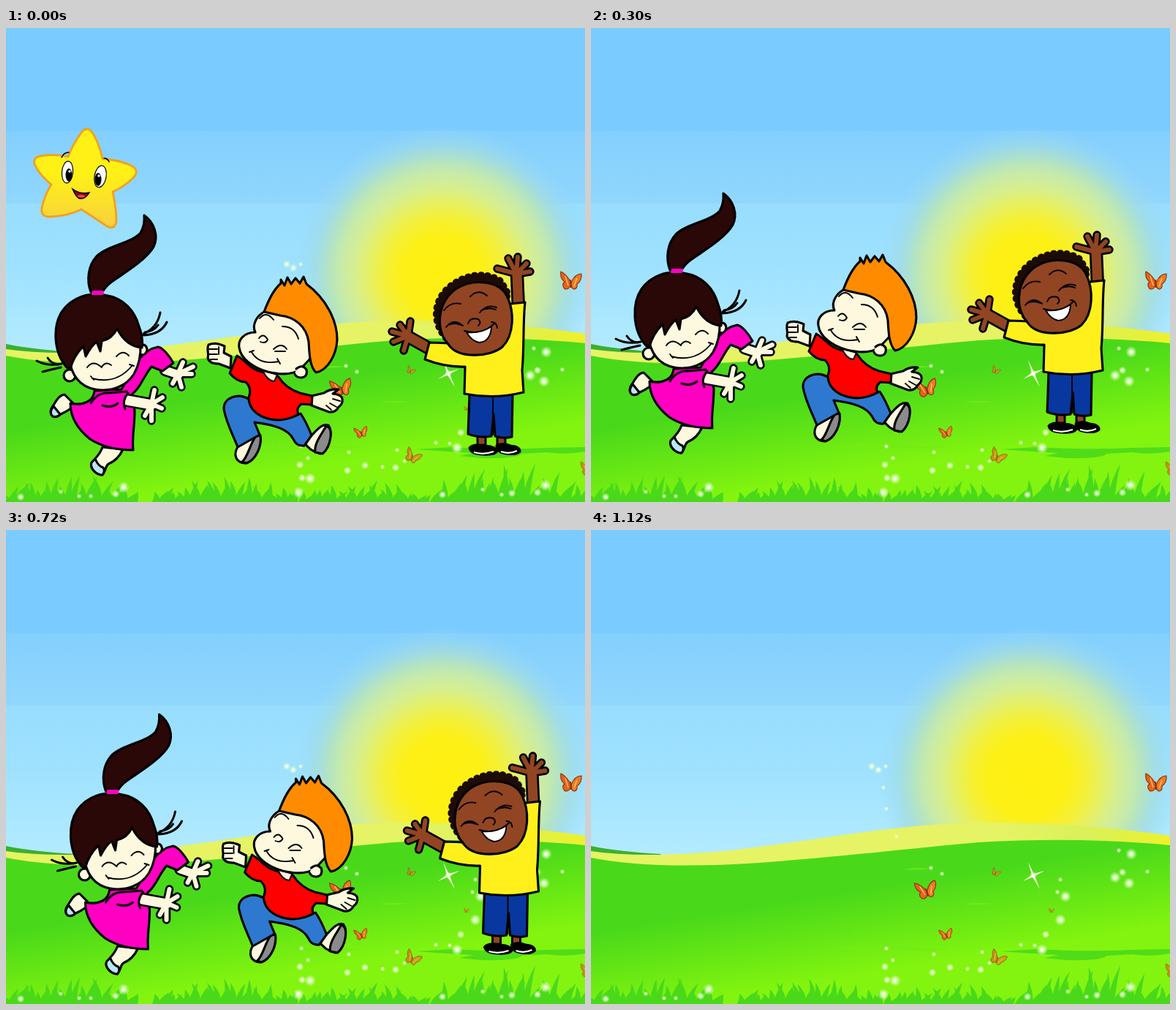
These frames come from a looping animation (792 by 648 pixels, 1.2 s). An HTML page:

```html
<!DOCTYPE html>
<html lang="en">
<head>
<meta charset="utf-8">
<title>Children on a sunny meadow</title>
<style>
  html, body { margin: 0; width: 100%; height: 100%; overflow: hidden; }
  svg { display: block; width: 100vw; height: 100vh; }
  .ink { stroke: #000; stroke-width: 3.1; stroke-linejoin: round; stroke-linecap: round; }
  .line { fill: none; stroke: #000; stroke-width: 1.9; stroke-linecap: round; stroke-linejoin: round; }
  .bold { stroke-width: 3; }
  .skin { fill: #fdf8de; }
  .brown { fill: #914523; }
  .hair { fill: #290807; }
  .pink { fill: #ff00c3; }
  .red { fill: #f00; }
  .orange { fill: #ff8c00; }
  .denim { fill: #2f78cf; }
  .navy { fill: #08379f; }
  .yellow { fill: #fff01c; }
  .sole { fill: #8b8b8b; }
  .shoe { fill: #b9e6f5; }
</style>
</head>
<body>
<svg id="scene" viewBox="0 0 792 648" preserveAspectRatio="none">
  <defs>
    <linearGradient id="sky" x2="0" y2="1">
      <stop offset="0" stop-color="#7acbff"/><stop offset=".3" stop-color="#7acbff"/>
      <stop offset=".3" stop-color="#83cffe"/><stop offset=".51" stop-color="#91d7fd"/>
      <stop offset=".51" stop-color="#98ddfe"/><stop offset=".7" stop-color="#9fe2ff"/>
      <stop offset="1" stop-color="#b8edff"/>
    </linearGradient>
    <radialGradient id="sun" gradientUnits="userSpaceOnUse" cx="598" cy="338" r="205">
      <stop offset="0" stop-color="#fff00f"/><stop offset=".27" stop-color="#fdf016"/>
      <stop offset=".39" stop-color="#f4f038"/><stop offset=".49" stop-color="#e6f063"/>
      <stop offset=".59" stop-color="#d6ee90"/><stop offset=".68" stop-color="#c8eba8"/>
      <stop offset=".76" stop-color="#b5e4c0"/><stop offset=".86" stop-color="#a3dcdf" stop-opacity=".7"/>
      <stop offset="1" stop-color="#98d9f8" stop-opacity="0"/>
    </radialGradient>
    <linearGradient id="ridge" gradientUnits="userSpaceOnUse" x1="560" x2="792">
      <stop offset="0" stop-color="#e6f364"/><stop offset=".5" stop-color="#d9f15a"/><stop offset="1" stop-color="#eef02a"/>
    </linearGradient>
    <linearGradient id="meadow" gradientUnits="userSpaceOnUse" x1="400" y1="488" x2="418" y2="600">
      <stop offset="0" stop-color="#4ad91a"/><stop offset="1" stop-color="#82f40f"/>
    </linearGradient>
    <linearGradient id="gold" x2="0" y2="1">
      <stop offset=".45" stop-color="#fff115"/><stop offset="1" stop-color="#f8d040"/>
    </linearGradient>
    <radialGradient id="glow">
      <stop offset="0" stop-color="#fff"/><stop offset=".3" stop-color="#f4ffe6" stop-opacity=".85"/>
      <stop offset=".6" stop-color="#e8ffc8" stop-opacity=".5"/><stop offset="1" stop-color="#dfffc0" stop-opacity="0"/>
    </radialGradient>
    <g id="butterfly" stroke="#8a300c" stroke-width="1.1">
      <path fill="#e8621a" d="M0,3 C-4,-4 -9,-10 -14,-12 C-15,-6 -13,-1 -9,2 C-13,5 -11,12 -6,12 C-2,11 0,7 0,3Z"/>
      <path fill="#f07a1e" d="M0,3 C3,-4 8,-9 14,-9 C15,-3 12,3 8,5 C9,11 5,13 2,11 C0,9 0,6 0,3Z"/>
      <path d="M-8,-6 L-4,7 M8,-3 L4,8" stroke="#ffd27a"/>
      <path d="M-1,-1 L0,10" stroke-width="2"/>
    </g>
  </defs>

  <rect width="792" height="470" fill="url(#sky)"/>
  <circle cx="598" cy="338" r="205" fill="url(#sun)"/>
  <path d="M0,432 Q40,440 96,443 L90,448 L0,444Z" fill="#3bb02f"/>
  <path d="M0,439 Q75,450 200,437 C330,421 420,401 540,400 Q670,400 792,418 V470 H0Z" fill="url(#ridge)"/>
  <path d="M0,448 C60,460 140,461 230,455 C350,446 450,434 530,427 Q670,419 792,431 V648 H0Z" fill="url(#meadow)"/>
  <g fill="#73ec14">
    <path d="M428,464 Q446,461 464,463 Q446,465 428,464Z"/>
    <path d="M510,511 Q532,509 552,511 Q530,513 510,511Z"/>
    <path d="M325,573 L362,570 365,565 369,570 375,562 380,569 386,565 391,569 397,561 403,569 411,565 415,570 424,567 430,571 Q470,572 490,574 Q400,577 325,573Z"/>
  </g>
  <path fill="#50dc18" d="M560,576 L610,573 Q680,577 740,574 L792,573 V579 Q765,584 740,580 L705,582 Q700,589 650,588 L620,585 640,581 Q600,579 560,576Z"/>
  <path id="grass" fill="#4ad91a"/>
  <g id="dots" fill="url(#glow)"/>
  <path fill="#fdffe6" d="M598,454 L605.5,470 620,466 607,473 614,491 604,474.5 591,480 603,471.5Z"/>
  <circle cx="605" cy="472" r="5" fill="url(#glow)"/>
  <use href="#butterfly" transform="translate(773 345)"/>
  <use href="#butterfly" transform="translate(459 491) rotate(-14)"/>
  <use href="#butterfly" transform="translate(486 552) rotate(-15) scale(.62)"/>
  <g opacity=".7">
    <use href="#butterfly" transform="translate(554 468) rotate(25) scale(.4)"/>
    <use href="#butterfly" transform="translate(557 585) rotate(25) scale(.75)"/>
    <use href="#butterfly" transform="translate(630 520) scale(.25)"/>
    <use href="#butterfly" transform="translate(797 602) scale(.75)"/>
  </g>

  <g id="children">
    <g id="girl">
      <path class="ink skin" d="M92,513 L80,501 C72,502 68,511 64,517 C58,525 62,533 71,530 Q82,525 92,518Z"/>
      <path class="ink shoe" d="M65,517 Q58,526 64,531 Q71,533 74,528Z" stroke-width="2"/>
      <path class="ink skin" d="M132,573 C128,585 121,588 117,595 C115,603 123,610 131,611 C137,607 135,600 140,596 Q153,591 160,576Z"/>
      <path class="ink shoe" d="M117,594 C114,602 124,611 132,611 Q136,606 133,601 Q126,599 122,589Z"/>
      <g data-limb="#fdf8de" data-base="M218,468 L236,474" data-width="11" data-tips="242,457 256,463 254,473 240,491 228,486" data-palm="235,473"/>
      <path class="ink pink" d="M121,496 C120,510 106,517 88,513 C88,534 100,550 115,562 C132,573 152,577 174,577 C172,560 176,545 176,524 L173,500 C184,492 187,478 199,463 L214,469 L229,458 C223,447 214,437 208,436 C196,438 188,445 180,455 L158,494Z"/>
      <g data-limb="#fdf8de" data-base="M166,509 L199,515" data-width="13" data-tips="203,495 214,505 213,520 199,537 190,530" data-palm="199,514"/>
      <path class="pink" d="M150,499 L166,499 Q158,512 163,522 L150,526Z"/>
      <path class="line bold" d="M116,513 Q125,498 140,499 L165,497 M132,516 Q145,520 153,513 M167,499 Q158,510 163,521"/>
      <g class="line bold">
        <path d="M76,459 Q57,463 42,455 M75,464 Q61,467 50,470 M72,460 Q62,459 57,451"/>
        <path d="M188,418 Q207,410 211,389 M188,420 Q212,419 220,402 M190,416 Q203,414 208,406"/>
      </g>
      <circle class="ink skin" cx="87" cy="475" r="8"/>
      <path class="ink skin" d="M181,434 Q192,430 193,440 Q191,449 183,446Z"/>
      <path class="ink skin" d="M86,450 C89,474 100,490 122,494 C145,498 165,489 175,473 Q185,456 184,432 L155,400 100,418Z"/>
      <path class="ink hair" d="M83,464 C64,442 64,406 77,387 C90,368 113,361 135,365 C161,369 176,386 182,408 Q188,424 186,437 Q164,435 152,411 Q145,425 131,428 L129,442 124,429 Q117,434 109,449 L106,435 Q92,449 88,466Z"/>
      <path class="line" d="M111,464 Q119,453 131,464 M131,463 Q137,455 144,461 M151,449 Q160,439 168,448 M118,479 Q151,488 173,461 M116,476 L120,481 M169,460 L175,462"/>
      <path class="ink hair" d="M189,256 C203,266 209,284 202,299 C192,317 160,336 146,346 Q136,353 132,361 L116,361 C110,345 112,325 124,312 C140,297 172,294 184,280 Q190,270 189,256Z"/>
      <path class="pink" d="M118,359 H134 L133,365 H117Z"/>
    </g>

    <g id="redhead">
      <path class="ink skin" d="M318,571 C310,583 314,594 327,595 C342,590 351,570 347,556Z"/>
      <path class="sole ink" d="M323,593 C331,587 334,567 342,558 L348,557 C350,572 342,590 329,595Z" stroke-width="2"/>
      <path class="ink skin" d="M408,566 C412,574 419,579 430,582 C440,576 449,554 441,543 C430,540 424,553 408,566Z"/>
      <path class="ink sole" d="M423,580 C421,568 432,555 438,544 C449,547 444,573 433,582Z"/>
      <path class="ink denim" d="M317,573 C309,553 301,539 298,521 C297,505 318,498 333,508 L350,530 Q380,540 403,527 Q411,539 418,557 L408,571 Q397,572 393,562 C386,549 370,543 340,539 L347,556Z"/>
      <path class="ink skin" d="M308,449 L298,444 L299,435 Q287,429 277,433 C274,440 278,445 276,451 Q278,459 291,459 L307,465Z"/>
      <path class="line" d="M278,439 L289,439 M278,446 L289,446 M280,453 L289,453 M291,436 V446"/>
      <path class="ink skin" d="M418,503 L435,499 Q443,493 455,494 L447,500 Q459,501 460,507 Q461,514 455,518 Q451,526 442,525 L418,516Z"/>
      <path class="line" d="M447,507 L457,510 M443,513 L452,518 M438,516 L445,522"/>
      <path class="ink red" d="M316,448 C328,455 335,467 349,470 L372,476 Q383,493 402,499 L419,503 L418,515 L404,514 Q396,520 400,528 Q376,542 350,531 Q332,522 332,505 Q337,493 328,484 Q316,484 306,472Z"/>
      <path class="skin line" d="M351,468 L371,474 367,483 Q358,483 351,468Z" style="fill:#fdf8de"/>
      <path class="ink skin" d="M353,388 C340,396 337,408 341,416 C326,416 317,426 319,437 C321,451 336,464 358,470 C379,475 393,473 402,467 L418,450 418,415 385,385Z"/>
      <path class="ink orange" d="M353,388 C360,370 366,358 376,349 L376,344 381,352 385,341 390,350 396,342 402,349 407,340 411,350 C438,370 453,400 453,426 C452,447 440,468 424,471 C415,462 415,444 414,429 C411,408 395,395 375,393Z"/>
      <path class="ink skin" d="M397,466 Q405,459 411,467 Q413,477 404,478 Q397,478 395,473"/>
      <path class="line" d="M347,397 Q356,386 366,399 M378,408 Q395,408 400,425 M346,424 Q352,416 358,426 Q355,432 348,429 M366,439 Q377,429 384,439 M368,442 L382,442 M336,443 Q346,461 373,456 M333,443 L339,441 M371,452 L375,459"/>
    </g>

    <g id="friend">
      <path class="brown" d="M645,556 H656 V570 H645Z M672,556 H683 V570 H672Z" stroke="#000" stroke-width="3"/>
      <path class="ink" d="M634,574 Q639,568 652,571 Q668,571 672,578 Q670,584 653,583 Q636,583 634,574Z"/>
      <path class="ink" d="M671,571 Q679,566 690,571 Q703,572 703,579 Q697,584 684,582 Q671,580 671,571Z"/>
      <path d="M640,580 Q653,584 667,579 M677,579 Q688,583 699,578" fill="none" stroke="#fff" stroke-width="2.2"/>
      <path class="ink navy" d="M634,500 L632,555 Q648,561 664,558 L667,528 669,558 Q680,562 692,559 L693,500Z"/>
      <path class="line" d="M666,505 V556"/>
      <g data-limb="#914523" data-base="M586,442 L550,422" data-width="13" data-tips="553,401 539,406 528,415 530,429 544,441" data-palm="550,421"/>
      <g data-limb="#914523" data-base="M701,384 L699,338" data-width="13" data-tips="672,329 687,315 700,313 712,322 717,333" data-palm="698,336"/>
      <path class="ink yellow" d="M579,430 Q595,430 614,432 L691,377 L710,375 C707,400 709,437 706,468 L708,498 Q667,508 627,500 L628,463 Q601,464 573,453Z"/>
      <path class="ink" fill="#1c0b06" stroke-dasharray="1 8" style="stroke:#1c0b06;stroke-width:9" d="M602,424 C584,405 584,378 601,359 C622,337 655,331 677,346 L688,365 640,400Z"/>
      <path class="ink brown" d="M600,426 C588,405 592,374 615,357 C638,342 674,345 685,366 C696,388 695,420 679,436 C662,450 621,452 607,435Z" stroke-width="2"/>
      <path class="line" d="M599,386 Q608,374 622,377 M635,367 Q646,356 658,366 M602,409 Q612,396 625,407 M605,406 Q614,402 622,406 M648,389 Q658,377 671,382 M650,386 Q661,381 670,385 M632,404 Q635,395 646,398 Q651,403 646,407 M627,414 Q651,421 668,404 M664,402 Q671,402 672,410"/>
      <path class="line" d="M630,416 Q650,418 664,408 Q663,429 647,430 Q637,428 630,416Z" style="fill:#fff"/>
    </g>
  </g>

  <g id="star">
    <path fill="url(#gold)" stroke="#f2a01f" stroke-width="2.8" stroke-linejoin="round" d="M101,146 Q111,130 120,146 Q128,160 132,179 Q152,180 169,187 Q185,194 173,206 Q161,217 146,224 Q151,248 151,264 Q149,277 138,271 Q119,258 103,248 Q85,257 62,258 Q47,259 49,246 Q53,228 62,214 Q45,200 39,186 Q37,176 48,175 Q65,172 85,176 Q91,160 101,146Z"/>
    <g stroke="#000" stroke-width="1.2" fill="#fff">
      <ellipse cx="84" cy="197" rx="7.5" ry="15" transform="rotate(5 84 197)"/>
      <ellipse cx="129" cy="203" rx="8" ry="15" transform="rotate(10 129 203)"/>
    </g>
    <ellipse cx="86" cy="201" rx="4.5" ry="9"/><ellipse cx="126" cy="207" rx="4.5" ry="9"/>
    <circle cx="87" cy="196" r="1.8" fill="#fff"/><circle cx="127" cy="202" r="1.8" fill="#fff"/>
    <path d="M91,220 Q102,228 114,225 Q108,235 100,233 Q95,230 91,220Z" fill="#8a0710" stroke="#000" stroke-width="1.4"/>
    <path d="M97,230 Q102,226 109,230 Q104,234 97,230Z" fill="#f7414d"/>
    <path class="line" d="M76,177 Q79,170 86,170 M134,178 Q139,178 141,183" style="stroke-width:1.5"/>
  </g>
</svg>
<script>
const byId = id => document.getElementById(id);

function seeded(seed) {
  return () => (seed = seed * 16807 % 2147483647) / 2147483647;
}

// Arms with spread fingers: a black pass, then a thinner coloured pass.
function drawLimb(group) {
  const { limb, base, width, tips, palm } = group.dataset;
  const fingers = tips.split(' ').map(tip => `M${palm} L${tip}`).join(' ');
  const pass = (color, extra) =>
    `<path d="${base}" stroke="${color}" stroke-width="${+width + extra}"/>` +
    `<path d="${fingers}" stroke="${color}" stroke-width="${6 + extra}"/>`;
  group.setAttribute('fill', 'none');
  group.setAttribute('stroke-linecap', 'round');
  group.innerHTML = pass('#000', 5.4) + pass(limb, 0);
}

function drawGrass() {
  const random = seeded(41);
  const tufts = [[0, 180, 38], [205, 400, 33], [405, 580, 30], [585, 792, 50]];
  let d = '';
  for (const [from, to, height] of tufts) {
    for (let x = from; x < to; x += 7) {
      const swell = 0.45 + 0.55 * Math.sin(Math.PI * (x - from) / (to - from));
      const h = height * swell * (0.5 + 0.6 * random());
      const lean = (random() - 0.35) * 22;
      d += `M${x - 5},648 Q${x - 2},${648 - h * 0.5} ${x + lean},${648 - h} Q${x + 7},${648 - h * 0.5} ${x + 5},648Z`;
    }
  }
  byId('grass').setAttribute('d', d);
}

function drawDots() {
  const large = '736,483 717,475 649,501 642,533 617,574 400,635 416,616 739,443 161,628 738,625';
  const medium = '384,323 393,328 727,468 622,553 402,597 405,615 467,605 491,598 533,601 150,637 727,635 20,641 597,638 692,636';
  const small = '403,323 400,352 404,381 418,419 465,462 480,470 722,438 761,467 642,478 638,495 588,567 607,568 469,580 404,572 413,588 515,600 535,577 545,592 75,634 100,640 116,640 652,631 678,638';
  const dots = (list, r) => list.split(' ').map(point => {
    const [x, y] = point.split(',');
    return `<circle cx="${x}" cy="${y}" r="${r}"/>`;
  }).join('');
  byId('dots').innerHTML = dots(large, 8) + dots(medium, 5.5) + dots(small, 3.5);
}

const LOOP = 1200;
const poses = [
  { until: 200, children: [0, 0], star: [0, 0] },
  { until: 300 },
  { until: 400, children: [-8, -30] },
  { until: 600, children: [0, 2], star: [289, -70] },
  { until: 800, children: [20.5, -4] },
  { until: 1000, children: [-16, 3], star: [570, 1] },
  { until: LOOP },
];

function place(id, offset) {
  const node = byId(id);
  node.setAttribute('visibility', offset ? 'visible' : 'hidden');
  if (offset) node.setAttribute('transform', `translate(${offset})`);
}

function render(time) {
  const pose = poses.find(({ until }) => time < until);
  place('children', pose.children);
  place('star', pose.star);
}

document.querySelectorAll('[data-limb]').forEach(drawLimb);
drawGrass();
drawDots();

const start = performance.now();
function tick() {
  render((performance.now() - start) % LOOP);
  requestAnimationFrame(tick);
}
tick();
</script>
</body>
</html>
```
